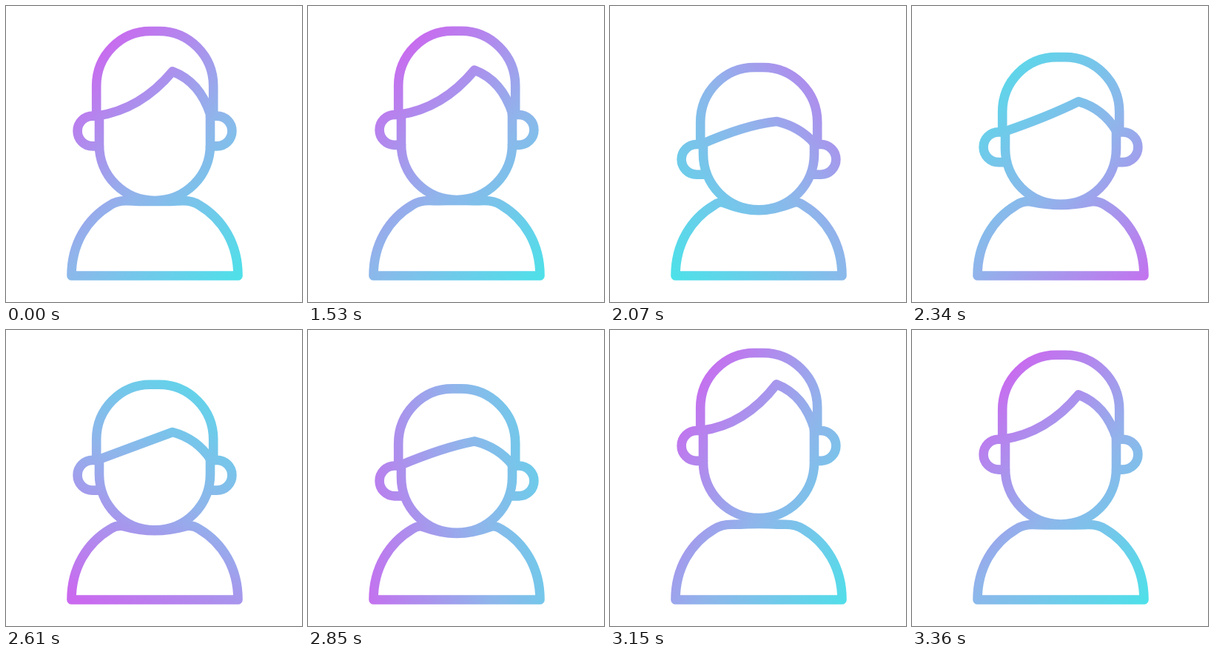
Animation of 400x400 px, one loop 3390 ms. Source, as an HTML page with a canvas:

```html
<!DOCTYPE html>
<html lang="en">
<head>
<meta charset="utf-8">
<title>Nodding avatar</title>
<style>
  html, body { margin: 0; width: 100%; height: 100%; overflow: hidden; background: #fff; }
  canvas { display: block; width: 400px; height: 400px; }
</style>
</head>
<body>
<canvas id="stage" width="400" height="400"></canvas>
<script>
const ctx = document.getElementById('stage').getContext('2d');
const LOOP = 3390, STEP = 30, MID = 201;

// Nod: rest, small lift, down, half up, down, overshoot, rest
const NOD = [1500, 1650, 2130, 2460, 2760, 3195, 3390];
const TOP = [34, 31.5, 85, 62.5, 85, 29.5, 34];
const EAR = [169, 153, 209.5, 183, 209.5, 155, 169];
const FRINGE = [88.5, 69, 159.4, 116.6, 159.4, 71, 88.5];
const CHIN = [263, 252.5, 276.2, 264.4, 276.2, 253.5, 263];

// Gradient turn
const TURN = [1530, 1830, 2070, 2610, 3000, 3390];
const ANGLE = [45, 90, 142, 302, 373, 405];
const LENGTH = [360, 310, 405, 388, 350, 360];

function segment(times, t) {
  let i = 0;
  while (i < times.length - 2 && t >= times[i + 1]) i++;
  const u = (t - times[i]) / (times[i + 1] - times[i]);
  return [i, Math.min(1, Math.max(0, u))];
}

function ease(values, t) {
  const [i, u] = segment(NOD, t);
  return values[i] + (values[i + 1] - values[i]) * (1 - Math.cos(Math.PI * u)) / 2;
}

function smooth(values, t) {
  const [i, u] = segment(TURN, t);
  const last = TURN.length - 1;
  const slope = k => k === 0 || k === last ? 0 :
    (values[k + 1] - values[k - 1]) / (TURN[k + 1] - TURN[k - 1]);
  const h = TURN[i + 1] - TURN[i], v = 1 - u;
  return v * v * (1 + 2 * u) * values[i] + u * u * (3 - 2 * u) * values[i + 1] +
    h * u * v * (v * slope(i) - u * slope(i + 1));
}

function paint(t) {
  const a = smooth(ANGLE, t) * Math.PI / 180, r = smooth(LENGTH, t) / 2;
  const dx = Math.cos(a) * r, dy = Math.sin(a) * r, cx = 221, cy = 213;
  const g = ctx.createLinearGradient(cx - dx, cy - dy, cx + dx, cy + dy);
  g.addColorStop(0, '#ca69ef');
  g.addColorStop(0.5, '#8fb5eb');
  g.addColorStop(1, '#4de1e9');
  return g;
}

function body(chin) {
  const neck = Math.max(262, chin + 1);
  const k = Math.min(1, (neck - 262) / 14);
  const mix = (p, q) => p + (q - p) * k;
  const x = mix(165, 154), y = mix(262.7, 266);
  const flip = v => 2 * MID - v;
  ctx.beginPath();
  ctx.moveTo(88.5, 364.5);
  ctx.bezierCurveTo(88.5, 322, 109, 288, 141, 269);
  ctx.bezierCurveTo(147, 265, mix(155, 150), mix(262.7, 264.5), x, y);
  ctx.bezierCurveTo(mix(177, 168), mix(262.7, 271.5), 186, neck, MID, neck);
  ctx.bezierCurveTo(flip(186), neck, flip(mix(177, 168)), mix(262.7, 271.5), flip(x), y);
  ctx.bezierCurveTo(flip(mix(155, 150)), mix(262.7, 264.5), flip(147), 265, flip(141), 269);
  ctx.bezierCurveTo(flip(109), 288, flip(88.5), 322, flip(88.5), 364.5);
  ctx.closePath();
  ctx.stroke();
}

function cap(top, base) {
  const l = 122.2, r = 280.2, y = top + 74;
  ctx.beginPath();
  ctx.moveTo(l, base);
  ctx.lineTo(l, y);
  ctx.bezierCurveTo(l, top + 33, 155, top, 195, top);
  ctx.lineTo(207, top);
  ctx.bezierCurveTo(247, top, r, top + 33, r, y);
  ctx.lineTo(r, base);
  ctx.stroke();
}

function face(base, chin) {
  const r = 75;
  ctx.beginPath();
  ctx.moveTo(MID - r, base);
  ctx.lineTo(MID - r, chin - r);
  ctx.arc(MID, chin - r, r, Math.PI, 0, true);
  ctx.lineTo(MID + r, base);
  ctx.stroke();
}

function ears(y) {
  const r = 20.4, q = Math.PI / 2;
  ctx.beginPath();
  ctx.moveTo(126, y - r);
  ctx.arc(117, y, r, -q, q, true);
  ctx.lineTo(126, y + r);
  ctx.moveTo(276, y - r);
  ctx.arc(285, y, r, -q, q);
  ctx.lineTo(276, y + r);
  ctx.stroke();
}

function fringe(peak, base) {
  const gap = base - peak;
  ctx.beginPath();
  ctx.moveTo(123, base);
  ctx.quadraticCurveTo(182, (peak + base) / 2 - 3 + (gap - 38) * 1.1, 225, peak);
  ctx.quadraticCurveTo(250 + gap * 0.2, peak + gap * 0.23, 276.5, base - 1);
  ctx.stroke();
}

function draw(t) {
  ctx.fillStyle = '#fff';
  ctx.fillRect(0, 0, 400, 400);
  ctx.strokeStyle = paint(t);
  ctx.lineWidth = 12.6;
  ctx.lineJoin = ctx.lineCap = 'round';

  const ear = ease(EAR, t), base = ear - 20.4, chin = ease(CHIN, t);
  body(chin);
  cap(ease(TOP, t), base);
  face(base, chin);
  ears(ear);
  fringe(ease(FRINGE, t), base);
}

function frame() {
  const t = performance.now() % LOOP;
  draw(Math.floor(t / STEP) * STEP);
  requestAnimationFrame(frame);
}
frame();
</script>
</body>
</html>
```
